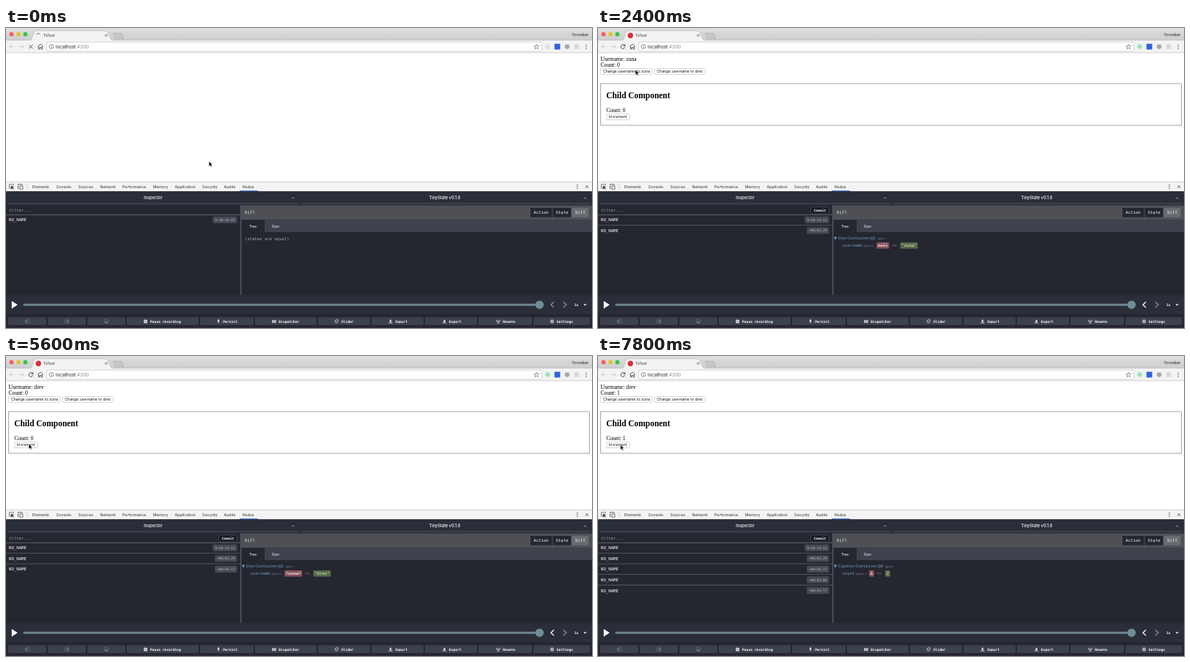
Recreate the animation shown at these times as an HTML page. Size 800 by 410 pixels, loop 8 s.

```html
<!DOCTYPE html>
<html lang="en">
<head>
<meta charset="utf-8">
<title>State demo</title>
<style>
  html, body { margin: 0; width: 100%; height: 100%; overflow: hidden; background: #fff; }
  svg { display: block; width: 100%; height: 100%; }
  .sans { font-family: Inter, sans-serif; }
  .serif { font-family: "Liberation Serif", serif; }
  .mono { font-family: "DejaVu Sans Mono", monospace; }
</style>
</head>
<body>
<svg id="stage" viewBox="0 0 800 410">
  <defs>
    <linearGradient id="strip" x2="0" y2="1"><stop stop-color="#dedede"/><stop offset="1" stop-color="#cdcdcd"/></linearGradient>
  </defs>
  <g id="fixed"></g>
  <g id="live"></g>
  <path id="pointer" d="M0 0V7.2L1.7 5.7L2.8 8.2L4.1 7.6L3 5.2H5.2Z" fill="#000" stroke="#fff" stroke-width=".6"/>
</svg>
<script>
const LOOP = 8000, STEP = 200;
const FIRST = 'zuna', SECOND = 'drev';
const CHAR = 3.43;

const INK = {
  panel: '#242630', bar: '#2a2e39', line: '#50535c', button: '#3c414d',
  pale: '#e8e9ec', dim: '#a9abb2', key: '#62a0c2'
};

// Pointer tip: time, x, y
const POINTER = [
  [0, 277, 182], [400, 277, 182], [1200, 53, 70], [1400, 52, 67], [1800, 51, 57], [2600, 51, 57],
  [3600, 96, 59], [4400, 96, 59], [5400, 31, 119], [5600, 31, 120], [6000, 30.5, 121], [8000, 30.5, 121]
];

const STATES = [
  { at: 0, loading: true, stamps: ['6:48:33.03'] },
  { at: 800, user: '---', count: 0, stamps: ['6:50:13.51'] },
  { at: 2000, user: FIRST, count: 0, added: '+00:01.29',
    diff: ['UserContainer@1', 'username', 'null', `"${FIRST}"`] },
  { at: 4200, user: SECOND, count: 0, added: '+00:02.17',
    diff: ['UserContainer@1', 'username', `"${FIRST}"`, `"${SECOND}"`] },
  { at: 6000, user: SECOND, count: 1, added: '+00:01.89',
    diff: ['CounterContainer@0', 'count', '0', '1'] },
  { at: 7800, user: SECOND, count: 1, added: '+00:01.77',
    diff: ['CounterContainer@0', 'count', '1', '2'] }
];
STATES.forEach((s, i) => { s.stamps ??= [...STATES[i - 1].stamps, s.added]; });

const rect = (x, y, w, h, fill, extra = '') =>
  `<rect x="${x}" y="${y}" width="${w}" height="${h}" fill="${fill}" ${extra}/>`;
const path = (d, stroke, width = 1, fill = 'none') =>
  `<path d="${d}" stroke="${stroke}" stroke-width="${width}" fill="${fill}"/>`;
const shape = (d, fill) => `<path d="${d}" fill="${fill}"/>`;
const disc = (x, y, r, fill) => `<circle cx="${x}" cy="${y}" r="${r}" fill="${fill}"/>`;
const text = (font, x, y, size, fill, str, extra = '') =>
  `<text class="${font}" x="${x}" y="${y}" font-size="${size}" fill="${fill}" ${extra}>${str}</text>`;
const sans = (...a) => text('sans', ...a);
const mono = (...a) => text('mono', ...a);
const serif = (...a) => text('serif', ...a);
const BOLD = 'font-weight="bold"', MIDDLE = 'text-anchor="middle"';
const dots = (x, y) => [-2.4, 0, 2.4].map(d => disc(x, y + d, .75, '#555')).join('');
const cross = (x, y, r, color, width) =>
  path(`M${x - r} ${y - r}l${2 * r} ${2 * r}m0 ${-2 * r}l${-2 * r} ${2 * r}`, color, width);
const caret = (x, y, fill) => shape(`M${x - 2.2} ${y - 1.1}h4.4l-2.2 2.4z`, fill);

function browser() {
  const lights = ['#fc5b57', '#e5bf3c', '#35c649'].map((c, i) => disc(7.5 + 9.5 * i, 8.5, 2.9, c)).join('');
  return rect(0, 0, 800, 17, 'url(#strip)') + lights +
    path('M0 17H34C37 17 37 4 41 4H136C140 4 141 17 145 17H800', '#b3b3b3', .7) +
    shape('M33 17.4C37 17 37 4.3 41 4.3H136C140 4.3 141 17 146 17.4Z', '#f3f3f3') +
    path('M146 7.2H157.5L160.5 14.3H149Z', '#aaa', .7, '#c8c8c8') +
    sans(51, 12.2, 5.2, '#333', 'TsTest') + cross(136.8, 10.2, 1.6, '#555', .8) +
    sans(795.5, 10.6, 5.4, '#222', 'Torvelian', 'text-anchor="end"') +
    rect(0, 17.2, 800, 16.8, '#f3f3f3') + path('M0 33.8H800', '#c5c5c5', .7) +
    path('M11 25.5H5M8 22.3L4.8 25.5L8 28.7M18 25.5H24M21 22.3L24.2 25.5L21 28.7', '#cfcfcf', 1) +
    path('M43.3 25.6L47 22L50.7 25.6M44.5 25V28.8H46V26.5H48V28.8H49.5V25', '#555', .9) +
    rect(55.5, 19.3, 676, 12.4, '#fff', 'rx="1.5" stroke="#c9c9c9" stroke-width=".7"') +
    `<circle cx="62" cy="25.5" r="2.9" fill="none" stroke="#666" stroke-width=".7"/>` +
    path('M62 25V27.2M62 23.6V24.3', '#666', .8) +
    sans(68, 27.8, 6.35, '#222', 'localhost<tspan fill="#888">:4200</tspan>') +
    path('M724.3 22.3L725.2 24.5L727.6 24.7L725.8 26.3L726.4 28.6L724.3 27.3L722.2 28.6L722.8 26.3L721 24.7L723.4 24.5Z', '#666', .7) +
    rect(748.8, 21.6, 7.8, 7.8, '#2f62dc') + disc(766, 25.5, 3.3, '#a9a9a9') +
    rect(775.8, 22.2, 6.4, 6.4, '#dadada') + dots(792, 25.5);
}

function tabStrip() {
  const tabs = { Elements: 36, Console: 68.5, Sources: 98.5, Network: 128.5, Performance: 159, Memory: 200.5,
    Application: 230.5, Security: 268, Audits: 297.5, Redux: 323 };
  return rect(0, 210, 800, 13.3, '#f3f3f3') + path('M0 210.2H800', '#c2c2c2', .7) +
    path('M8 219H4.5V213.7H10V216', '#666', .8) + shape('M6.3 215.5L11 217.4L9 218.2L10.7 220L9.9 220.8L8.2 219L7.4 220.6Z', '#333') +
    path('M17.5 219.5H16.5V213.5H22V215M18.8 215.8H23V220.2H18.8Z', '#555', .8) +
    path('M28.5 212.5V221', '#ccc', .7) +
    Object.entries(tabs).map(([name, x]) => sans(x, 218.6, 5.3, '#333', name)).join('') +
    rect(319, 222, 25, 1.3, '#3b7de0') + dots(780, 216.8) + cross(793, 216.8, 1.9, '#444', .8);
}

function inspector() {
  return rect(0, 223.3, 800, 187, INK.panel) + rect(0, 223.3, 800, 19.2, INK.bar) +
    path('M3 240H398M402 240H797', INK.line, 1) +
    sans(201, 234.4, 5.6, '#fff', 'Inspector', `${MIDDLE} font-weight="500"`) +
    sans(599, 234.4, 5.7, '#fff', 'TinyState v0.1.0', `${MIDDLE} font-weight="500"`) +
    caret(392, 232.8, '#777b84') + caret(790.5, 232.8, '#777b84') +
    mono(4, 251, 5.6, '#9b9da5', 'filter...') + path('M0 255.4H320', INK.line, 1.2) +
    rect(320, 242.5, 480, 19.7, '#4e5056') + mono(326, 254.2, 5.7, '#dddee1', 'Diff') +
    rect(715.5, 245.2, 80.5, 14, INK.panel, 'rx="1.5" stroke="#62646b" stroke-width=".7"') +
    rect(772, 245.5, 23.7, 13.4, '#696b71') + path('M746 245V259M772 245V259', '#62646b', .7) +
    [['Action', 730.5], ['State', 759], ['Diff', 784]]
      .map(([s, x]) => mono(x, 254.3, 5.7, '#f2f2f3', s, MIDDLE)).join('') +
    rect(320, 262.2, 480, 16.8, '#3f424c') + rect(321, 262.2, 32, 17, INK.panel) +
    path('M353 262.5H383', '#34363f', .8) +
    sans(337, 273, 5, '#fff', 'Tree', MIDDLE) + sans(368, 273, 5, '#e0e1e4', 'Raw', MIDDLE) +
    path('M320.6 242.5V365', INK.line, 1.7);
}

function icon(kind, x) {
  const y = 401, c = '#f0f0f2';
  switch (kind) {
    case 'pause': return disc(x, y, 2.5, c) + path(`M${x - .7} ${y - 1}v2m1.4 -2v2`, INK.button, .7);
    case 'pin': return shape(`M${x - 1} ${y - 2.6}h2v2l.9 1.2h-3.8l.9 -1.2z`, c) + path(`M${x} ${y + .4}v2.3`, c, .6);
    case 'keys': return rect(x - 2.7, y - 1.8, 5.4, 3.6, c, 'rx=".5"') + path(`M${x - 1.8} ${y - .5}h3.6m-3 1.3h2.4`, INK.button, .6);
    case 'clock': return path(`M${x - 2} ${y - 1.8}a2.3 2.3 0 1 0 3 -.3M${x - 2.2} ${y - 2.2}L${x + .4} ${y + .5}M${x - .5} ${y - 2.7}h2`, c, .7);
    case 'down': return shape(`M${x - .7} ${y - 2.4}h1.4v1.7h1.2l-1.9 1.8l-1.9 -1.8h1.2z`, c) + rect(x - 2.4, y + 1.4, 4.8, 1, c);
    case 'up': return shape(`M${x - .7} ${y + 1}h1.4v-1.6h1.2l-1.9 -1.9l-1.9 1.9h1.2z`, c) + rect(x - 2.4, y + 1.4, 4.8, 1, c);
    case 'aerial': return path(`M${x - 2.3} ${y - 2.3}v2.4h4.6v-2.4M${x} ${y - 1.6}v4M${x - 1.4} ${y + 2.4}h2.8`, c, .7);
    case 'gear': return `<circle cx="${x}" cy="${y}" r="1.5" fill="none" stroke="${c}" stroke-width="1.1"/>` +
      `<circle cx="${x}" cy="${y}" r="2.3" fill="none" stroke="${c}" stroke-width=".8" stroke-dasharray=".9"/>`;
    default: {
      const part = { left: [x - 2, 1.6, 4], right: [x + .5, 1.6, 4], bottom: [x - 2, 4, 1.4] }[kind];
      return rect(x - 2.2, 398.8, 4.4, 4.4, 'none', 'stroke="#747985" stroke-width=".6"') +
        rect(part[0], kind === 'bottom' ? 401.5 : 399, part[1], part[2], '#747985');
    }
  }
}

function controls() {
  // Button: left, right, icon, icon x, label
  const buttons = [
    [3, 55, 'left', 29], [57, 109, 'right', 83], [111, 163, 'bottom', 137],
    [165, 263, 'pause', 190.5, 'Pause recording'], [265, 338, 'pin', 290, 'Persist'],
    [340, 424, 'keys', 366, 'Dispatcher'], [426, 497, 'clock', 451.5, 'Slider'],
    [499, 570, 'down', 525, 'Import'], [572, 643, 'up', 598.5, 'Export'],
    [645, 718, 'aerial', 672, 'Remote'], [720, 797, 'gear', 745.5, 'Settings']
  ];
  return rect(0, 365, 800, 26.5, INK.bar) + rect(0, 391.5, 800, 18.5, INK.panel) +
    rect(0, 408.5, 800, 1.5, '#30283a') +
    shape('M7.8 373L15.8 378.3L7.8 383.6Z', '#fff') +
    rect(23.5, 376.8, 705, 3, '#6b858f', 'rx="1.5"') + disc(728.4, 378.2, 5.7, '#728d97') +
    path('M761 374.3L765 378.2L761 382.1', '#8b8f98', 1.3) +
    mono(776, 380, 4.7, '#fff', '1x', BOLD) + caret(790.5, 378.4, '#e8e8ea') +
    buttons.map(([l, r, kind, x, label]) => rect(l, 395.3, r - l, 10.7, INK.button, 'rx="1"') +
      icon(kind, x) + (label ? mono(x + 6.3, 402.6, 4.65, '#fff', label, BOLD) : '')).join('');
}

const pageButton = (x, y, w, label) =>
  rect(x, y, w, 7.8, '#fff', 'rx="1.6" stroke="#b9b9b9" stroke-width=".6"') +
  sans(x + w / 2, y + 5.7, 5.15, '#111', label, MIDDLE);

function page({ user, count }) {
  return serif(3.5, 44.8, 7.62, '#000', `Username: ${user}`) + serif(3.5, 53.2, 7.62, '#000', `Count: ${count}`) +
    pageButton(3.3, 55.6, 71.2, `Change username to ${FIRST}`) +
    pageButton(77.3, 55.6, 69, `Change username to ${SECOND}`) +
    rect(3.6, 76, 793, 57, 'none', 'stroke="#9a9ba6" stroke-width=".9"') +
    serif(11.2, 95.8, 11.43, '#000', 'Child Component', BOLD) +
    serif(11.2, 114.8, 7.62, '#000', `Count: ${count}`) + pageButton(11.3, 117.6, 31.8, 'Increment');
}

function tabStatus(loading) {
  return loading
    ? path('M41.5 9.2A3 3 0 0 1 46.5 8.4', '#666', 1) + cross(34, 25.5, 2.6, '#555', 1) + disc(739.5, 25.5, 3.3, '#e0e0e0')
    : disc(44.3, 10.3, 3.7, '#dd2c3c') + path('M36.2 23.8A2.8 2.8 0 1 0 36.7 26.2', '#555', 1) +
      shape('M37.3 22V25H34.3Z', '#555') + disc(739.5, 25.5, 3.3, '#9ce3bd');
}

function actionList(stamps) {
  const rows = stamps.map((stamp, i) => {
    const y = 262.2 + 14.55 * i, w = stamp.length * 2.71 + 6;
    return (i ? path(`M0 ${y - 7.3}H320`, INK.line, 1.1) : '') +
      mono(4, y + 2.1, 5.7, '#fff', 'NO_NAME') +
      rect(315.5 - w, y - 4.6, w, 9.2, '#474a54', 'rx="1"') +
      mono(315.5 - w / 2, y + 1.7, 4.5, '#c3c5cb', stamp, MIDDLE);
  }).join('');
  const commit = rect(290.5, 244.6, 25, 9.4, '#1b1d25', 'rx="1.5" stroke="#555862" stroke-width=".6"') +
    mono(303, 251, 4.5, '#fff', 'Commit', `${MIDDLE} ${BOLD}`);
  return rows + (stamps.length > 1 ? commit : '');
}

function value(x, str, fill, ink, extra = '') {
  const w = str.length * CHAR + 3.4;
  return rect(x, 293, w, 8.6, fill, 'rx="1.2"') + mono(x + 1.7, 299.4, 5.7, ink, str, extra);
}

function diffTree([owner, key, before, after]) {
  const keyEnd = 333.3 + key.length * CHAR, x = keyEnd + 19.5;
  const arrow = x + before.length * CHAR + 7.2;
  return shape('M322 285.6H326.2L324.1 289.8Z', INK.key) + mono(328, 289.3, 5.65, INK.key, owner) +
    mono(329.6 + owner.length * CHAR, 289, 4, '#8a8d95', '(pin)') +
    mono(333.3, 299.4, 5.7, INK.key, key) + mono(keyEnd + 1.2, 299, 4, '#8a8d95', '(pin)') +
    mono(keyEnd + 13, 299.4, 5.7, INK.key, ':') +
    value(x, before, '#8b525d', '#f0dfe2', 'text-decoration="line-through"') +
    mono(arrow, 299.4, 5.7, '#a06a80', '=&gt;') +
    value(arrow + 11.4, after, '#566a48', '#e3ecd9');
}

function scene(s) {
  return tabStatus(s.loading) + (s.loading ? '' : page(s)) + actionList(s.stamps) +
    (s.diff ? diffTree(s.diff) : mono(325.8, 289.6, 5.63, INK.dim, '(states are equal)')) +
    path('M748 374.3L744 378.2L748 382.1', s.diff ? '#fff' : '#8b8f98', 1.3);
}

function pointerAt(t) {
  const i = POINTER.findIndex(k => k[0] > t);
  const [t0, x0, y0] = POINTER[i - 1], [t1, x1, y1] = POINTER[i];
  const p = (t - t0) / (t1 - t0), e = p * p * (3 - 2 * p);
  return [x0 + (x1 - x0) * e, y0 + (y1 - y0) * e];
}

const byId = id => document.getElementById(id);
byId('fixed').innerHTML = rect(0, 34, 800, 176, '#fff') + browser() + tabStrip() + inspector() + controls();

let shown;
const start = performance.now();
function draw(now) {
  const t = Math.floor(Math.max(0, now - start) % LOOP / STEP) * STEP;
  const state = STATES.findLast(s => s.at <= t);
  if (state !== shown) byId('live').innerHTML = scene(shown = state);
  byId('pointer').setAttribute('transform', `translate(${pointerAt(t)})`);
  requestAnimationFrame(draw);
}
draw(start);
</script>
</body>
</html>
```
